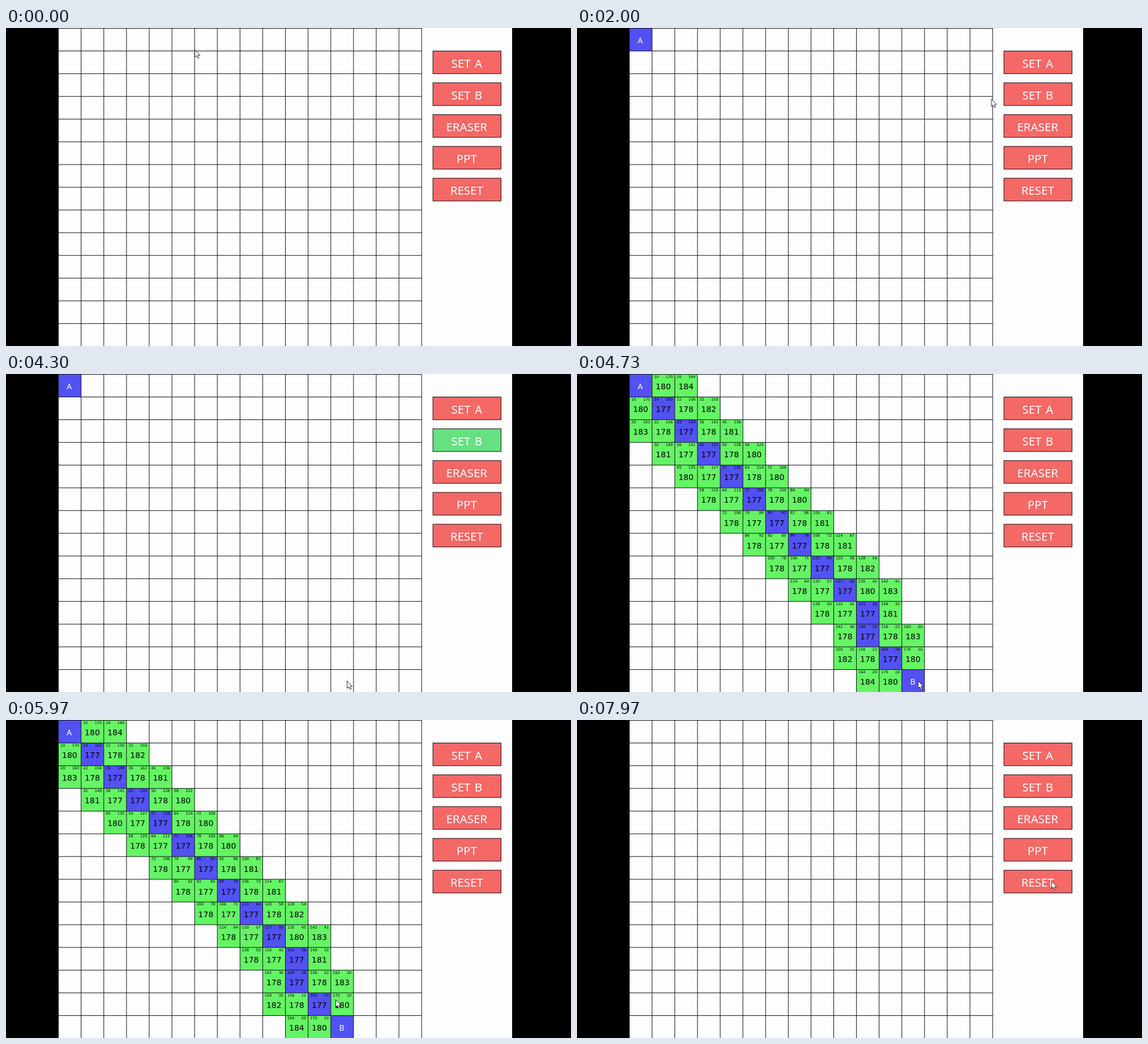
Recreate the animation shown at these times as an HTML page. Size 998 px wide and 561 px high, loop 8 s.

```html
<!DOCTYPE html>
<html lang="en">
<head>
<meta charset="utf-8">
<title>Path finding grid</title>
<style>
  html, body { margin: 0; width: 100%; height: 100%; overflow: hidden; background: #000; }
  svg { display: block; width: 100%; height: 100%; }
  text { font-family: "Noto Sans", "Open Sans", sans-serif; }
  .line { stroke: #0c0c14; stroke-width: 1; }
  .button { fill: #f46866; stroke: #14080c; stroke-width: 1; }
  .label { font-size: 20.5px; word-spacing: 0.1em; fill: #fff; text-anchor: middle; }
  .open { fill: #64f464; }
  .path { fill: #5251f2; }
  .total { font: 14px "DejaVu Sans", sans-serif; text-anchor: middle; }
  .cost { font: 6.5px "DejaVu Sans", sans-serif; }
  .right { text-anchor: end; }
  .mark { font-size: 14px; fill: #fff; text-anchor: middle; }

  .start, .result, .button, #cursor { animation: 8s step-end infinite; }
  .start { animation-name: start; }
  .result { animation-name: result; }
  .set-a { animation-name: set-a; }
  .set-b { animation-name: set-b; }
  #cursor { animation-name: move; animation-timing-function: ease-in-out; }

  @keyframes start {
    0% { visibility: hidden; }
    17% { visibility: visible; }
    90.8%, 100% { visibility: hidden; }
  }
  @keyframes result {
    0% { visibility: hidden; }
    55% { visibility: visible; }
    90.8%, 100% { visibility: hidden; }
  }
  @keyframes set-a {
    0% { fill: #f46866; }
    7.5% { fill: #66e080; }
    17%, 100% { fill: #f46866; }
  }
  @keyframes set-b {
    0% { fill: #f46866; }
    29% { fill: #66e080; }
    55%, 100% { fill: #f46866; }
  }
  @keyframes move {
    0% { transform: translate(333px, 38px); }
    6%, 8.75% { transform: translate(800px, 58px); }
    15.5%, 18.75% { transform: translate(108px, 18px); }
    25% { transform: translate(731px, 125px); animation-timing-function: ease-out; }
    27.5%, 31.25% { transform: translate(800px, 118px); }
    40.375% { transform: translate(595px, 520px); }
    45%, 64% { transform: translate(602px, 541px); }
    74.625%, 77% { transform: translate(582px, 493px); }
    85%, 87.125% { transform: translate(840px, 274px); }
    90%, 100% { transform: translate(838px, 284px); }
  }
</style>
</head>
<body>
<svg id="stage" viewBox="0 0 998 561"></svg>
<script>
const CELL_W = 40.1, CELL_H = 40.07, LEFT = 92.55, TOP = 0.5, COLS = 16, ROWS = 14;
const GOAL = { col: 12, row: 13 };
const LABELS = ["SET A", "SET B", "ERASER", "PPT", "RESET"];
// First and last visited column of each row.
const SPANS = [
  [0, 2], [0, 3], [0, 4], [1, 5], [2, 6], [3, 7], [4, 8],
  [5, 9], [6, 10], [7, 11], [8, 11], [9, 12], [9, 12], [10, 12]
];

const stage = document.getElementById("stage");
const colX = col => LEFT + col * CELL_W;
const rowY = row => TOP + row * CELL_H;
const distance = (cols, rows) => Math.round(10 * Math.hypot(cols, rows));

function add(parent, tag, attrs, content = "") {
  const node = document.createElementNS("http://www.w3.org/2000/svg", tag);
  for (const key in attrs) node.setAttribute(key, attrs[key]);
  node.textContent = content;
  parent.appendChild(node);
  return node;
}

function fillCell(parent, col, row, kind) {
  add(parent, "rect", { x: colX(col), y: rowY(row), width: CELL_W, height: CELL_H, class: kind });
}

function cellText(parent, col, row, dx, dy, kind, content) {
  add(parent, "text", { x: colX(col) + dx, y: rowY(row) + dy, class: kind }, content);
}

add(stage, "rect", { width: 998, height: 561, fill: "#000" });
add(stage, "rect", { x: 92.5, width: 801.5, height: 561, fill: "#fdfdfe" });

const startFill = add(stage, "g", { class: "start" });
const resultFill = add(stage, "g", { class: "result" });
const grid = add(stage, "g", { class: "line" });
const startText = add(stage, "g", { class: "start" });
const resultText = add(stage, "g", { class: "result" });

for (let col = 0; col <= COLS; col++)
  add(grid, "line", { x1: colX(col), x2: colX(col), y1: 0, y2: 561 });
for (let row = 0; row < ROWS; row++)
  add(grid, "line", { x1: LEFT, x2: colX(COLS), y1: rowY(row), y2: rowY(row) });

fillCell(startFill, 0, 0, "path");
cellText(startText, 0, 0, 19.3, 26.3, "mark", "A");

SPANS.forEach(([first, last], row) => {
  const pathCol = row > 10 ? row - 1 : row;
  for (let col = first; col <= last; col++) {
    if (!col && !row) continue;
    const isGoal = col === GOAL.col && row === GOAL.row;
    fillCell(resultFill, col, row, col === pathCol ? "path" : "open");
    if (isGoal) {
      cellText(resultText, col, row, 19.3, 26.3, "mark", "B");
      continue;
    }
    const g = distance(col, row);
    const h = distance(GOAL.col - col, GOAL.row - row);
    cellText(resultText, col, row, 3.5, 6.4, "cost", g);
    cellText(resultText, col, row, 36.5, 6.4, "cost right", h);
    cellText(resultText, col, row, 19.8, 26.6, "total", g + h);
  }
});

LABELS.forEach((label, i) => {
  const y = 40.6 + i * 56.1;
  const kind = label.toLowerCase().replace(" ", "-");
  add(stage, "rect", { x: 754.1, y, width: 120.3, height: CELL_H, class: "button " + kind });
  add(stage, "text", { x: 813.8, y: y + 29.4, class: "label" }, label);
});

add(stage, "path", {
  id: "cursor", d: "M.5 .5V13.5L3.4 10.8L5.5 15.5L7.8 14.5L5.7 10H9.5Z",
  fill: "#fff", stroke: "#111", "stroke-width": 0.9
});
</script>
</body>
</html>
```
